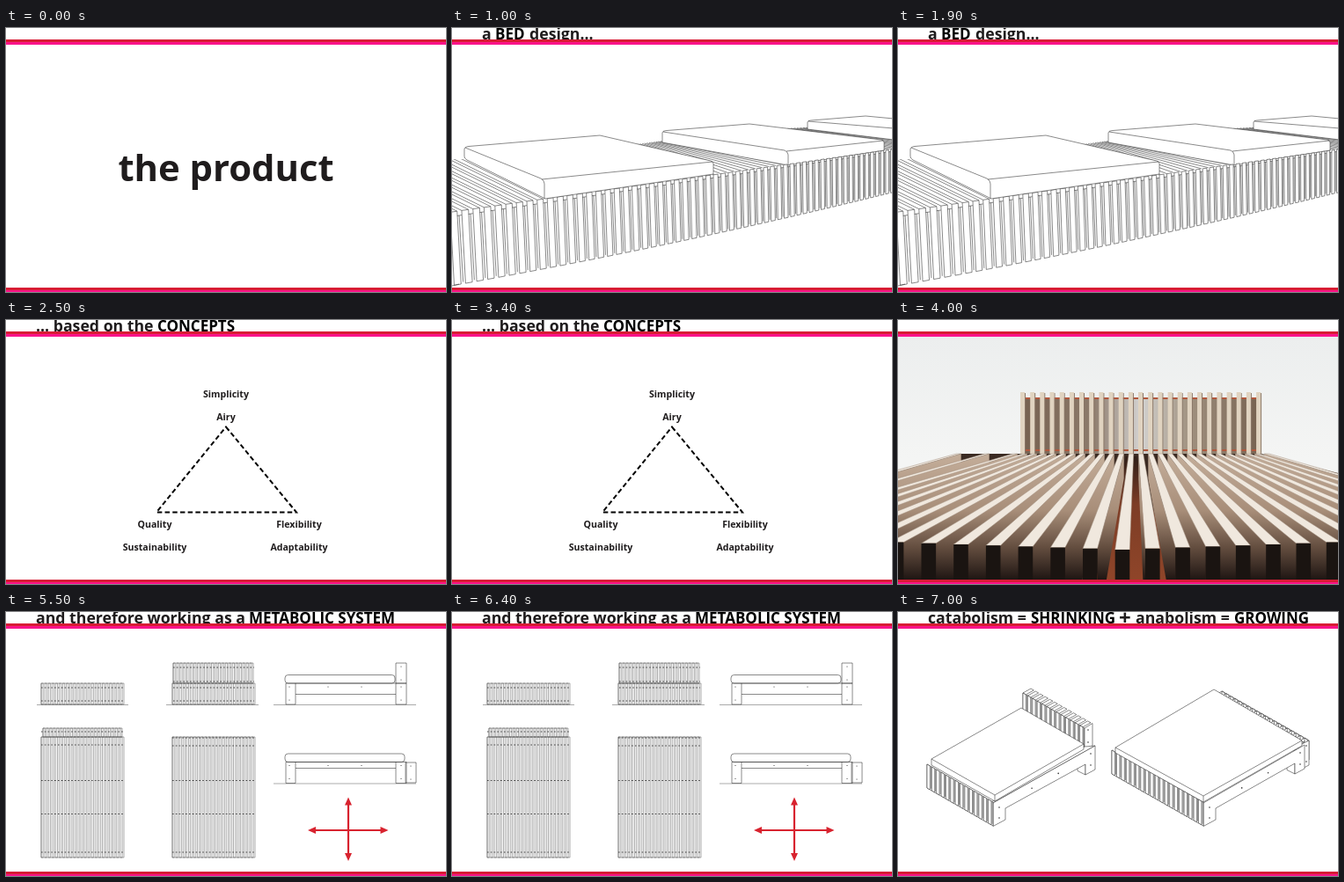
An HTML page for the animation above (8 s loop, 500 by 300 pixels).

```html
<!DOCTYPE html>
<html lang="en">
<head>
<meta charset="utf-8">
<title>The product</title>
<style>
  html, body { margin: 0; width: 100%; height: 100%; overflow: hidden; background: #fff; }
  svg { display: block; width: 100vw; height: 100vh; }
  text { font-family: "Open Sans", "Noto Sans", sans-serif; font-weight: 700; fill: #1f1c1d; }
  .head { font-size: 17.7px; }
  .caps { font-size: 17px; fill: #000; }
  .label { font-size: 10.6px; text-anchor: middle; }
  .ink, .solid { stroke: #2a2a2a; stroke-width: .55; stroke-linejoin: round; fill: none; }
  .solid { fill: #fff; }
  .thin { stroke: #555; stroke-width: .5; fill: none; }
  .dots { stroke: #333; stroke-width: .9; stroke-dasharray: 1.6 2.2; fill: none; }
</style>
</head>
<body>
<svg id="stage" viewBox="0 0 500 300" xmlns="http://www.w3.org/2000/svg"></svg>
<script>
const n1 = v => Math.round(v * 10) / 10;
const range = (a, b) => Array.from({ length: b - a }, (_, i) => a + i);
const mix = (a, b, t) => a + (b - a) * t;
const path = (d, attrs = '') => `<path d="${d}" ${attrs}/>`;
const seg = (x1, y1, x2, y2) => `M${n1(x1)} ${n1(y1)}L${n1(x2)} ${n1(y2)}`;
const quad = (...p) => 'M' + p.map(n1).join(' ') + 'Z';
const box = (x, y, w, h) => `M${n1(x)} ${n1(y)}h${n1(w)}v${n1(h)}h${n1(-w)}z`;
const solid = d => path(d, 'class="solid"');
const ink = d => path(d, 'class="ink"');
const dot = (x, y, r = .8) => `<circle cx="${x}" cy="${y}" r="${r}" fill="#333"/>`;

// Title parts: [x, text, capitals?]
const head = (...parts) => parts.map(([x, s, caps]) =>
  `<text class="head${caps ? ' caps' : ''}" x="${x}" y="13">${s}</text>`).join('');

function productScene() {
  return '<text x="250" y="174" font-size="41.8" text-anchor="middle">the product</text>';
}

// Long slatted bench in perspective with three mattresses
function benchScene() {
  const top = x => 209 - .142 * x;
  const foot = x => 292 - .175 * x - .00007 * x * x;
  let deck = '', posts = '', x = -2, s = 13;
  while (x < 500) {
    const r = x + .6 * s, m = x + .78 * s, next = x + s;
    const lean = 4.5 * Math.max(0, 1 - x / 480), nick = .4 * s;
    if (x < 110) {
      for (const a of [x, r]) deck += seg(a, top(a), a - 100, top(a) - 49);
    }
    posts += solid(quad(x, top(x), r, top(r), r + lean, foot(r), x + lean, foot(x)));
    posts += ink(seg(r, top(r) + nick, next, top(next) + nick) +
      seg(m, top(m) + nick, m + lean, foot(m) - 2));
    x = next;
    s *= .985;
  }
  let gaps = '';
  for (const i of range(0, 13)) {
    const t = i / 12;
    gaps += seg(mix(211, 242, t), mix(132, 128, t), mix(290, 384, t), mix(168, 154, t));
    gaps += seg(mix(364, 406, t), mix(115, 113, t), mix(482, 540, t), mix(140, 133, t));
  }
  return `<g clip-path="url(#deckClip)">${ink(deck)}</g>` +
    ink(gaps) +
    solid('M404 107Q404 105 408 105L470 100L502 103V127L404 115Z') + ink('M405 106L502 114') +
    solid('M239 119Q239 117 243 116.600L338 109L488 127Q491 128 491 130V139L382 156L239 130Z') +
    ink('M240 118L378 139Q382 141 382 144V156M380 140L490 128') +
    posts + ink('M0 293L8 291') +
    solid('M14 138Q14 135 19 134.500L168 122L294 151Q297 152 297 154V166L106 194L17 150Q14 148 14 146Z') +
    ink('M15 136L101 171Q105 173 105 177V194M102 172L296 152') +
    head([34, 'a'], [49, 'BED', 1], [88, 'design...']);
}

function conceptScene() {
  const labels = [[250, 88, 'Simplicity'], [250, 114, 'Airy'], [169, 236, 'Quality'],
    [169, 262, 'Sustainability'], [333, 236, 'Flexibility'], [333, 262, 'Adaptability']];
  return path('M250 121.500L330 218.500H171Z',
      'fill="none" stroke="#000" stroke-width="2" stroke-dasharray="5.5 3.2"') +
    labels.map(([x, y, s]) => `<text class="label" x="${x}" y="${y}">${s}</text>`).join('') +
    head([34, '... based on the'], [172, 'CONCEPTS', 1]);
}

// Timber bed seen from its foot
function timberScene() {
  let out = '<rect y="19" width="500" height="276" fill="url(#wall)"/>' +
    path('M0 172L69 152H413L500 174V295H0Z', 'fill="#3a2a22"') +
    path('M259 155H271L315 295H225Z', 'fill="url(#floor)"') +
    path(box(139, 89, 274, 63), 'fill="url(#behind)"') +
    path('M139 89H413M139 148H413', 'stroke="#b2573c" stroke-width="2"');
  for (const i of range(0, 25)) {
    const x = 139 + i * 11.17;
    out += path(box(x + 4.8, 83, 1.2, 69), 'fill="#8a7767"') +
      path(box(x, 82, 5, 70), 'fill="#e0d3c0"');
  }
  // Outer beams first, so that inner ones overlap them
  const order = range(-14, 15).sort((a, b) => Math.abs(b) - Math.abs(a));
  for (const k of order) {
    const fx = 255 + (k < 0 ? 36.7 : 34.3) * k, fy = 261 - 1.2 * Math.abs(k);
    const bx = 265 + 11 * k - 21 * Math.max(0, -12 - k);
    const side = k < 0 ? 1 : -1, w = 8.3, e = 2.7;
    if (k) {
      const f = fx + side * w, b = bx + side * e;
      out += path(quad(f, fy, b, 152, b, 180, f, 355), 'fill="url(#side)"');
    }
    out += path(quad(fx - w, fy, fx + w, fy, bx + e, 152, bx - e, 152),
        'fill="#f0e8de" stroke="#a39080" stroke-width=".5"') +
      path(box(fx - w, fy, 2 * w, 50), 'fill="#1a1411"');
  }
  return out;
}

// Front views, plans and side views
function systemScene() {
  const slats = (x, y, w, h, n = 23) => {
    const p = w / n;
    let d = box(x, y, w, h);
    for (const i of range(0, n)) d += box(x + i * p, y, p * .55, h);
    return path(d, 'class="thin"');
  };
  const rows = (x, w, ...ys) => path(ys.map(y => seg(x, y, x + w, y)).join(''), 'class="dots"');
  const ground = (a, b, y) => path(seg(a, y, b, y), 'class="thin"');
  const side = (y, railY, backX, backY, soft) => ink(
      `M318 ${y}H455V${y + 24}H443V${railY}H329V${y + 24}H318ZM329 ${y}V${railY}M443 ${y}V${railY}` +
      box(backX, backY, 12, 23)) +
    `<rect x="317" y="${y - 9.5}" width="${soft}" height="9.500" rx="3.500" class="ink"/>` +
    ground(304, 466, y + 24.5) +
    [[322, 4], [366, 4], [404, 4], [449, 4], [322, 19], [449, 19]].map(([x, d]) => dot(x, y + d, .6)).join('') +
    dot(backX + 6, backY + 4, .6) + dot(backX + 6, backY + 19, .6);

  return slats(40, 81, 94, 24) + rows(40, 94, 86, 101) + ground(35, 139, 105.5) +
    slats(190, 58, 91, 23) + slats(189, 81, 94, 24) +
    rows(190, 92, 63, 79, 86, 101) + ground(182, 287, 105.5) +
    slats(42, 132, 90, 10) + slats(40, 142, 94, 137) + rows(40, 94, 136, 151, 191.5, 229.5, 273) +
    slats(189, 142, 94, 137) + rows(189, 94, 143, 152, 191.5, 229.5, 273) +
    side(81, 93.5, 443, 58, 125) + side(170.5, 177.5, 454, 171, 136) +
    path('M349 248H428M389 217V277', 'stroke="#d8232f" stroke-width="2.200"') +
    path('M343 248l9 -4v8zM434.500 248l-9 -4v8zM389 210.500l-4 9h8zM389 283l-4 -9h8z', 'fill="#d8232f"') +
    head([34, 'and therefore working as a'], [276, 'METABOLIC SYSTEM', 1]);
}

// Row of upright slats running along an oblique edge; dx, dy give the depth of their tops
function slatRow(x1, y1, x2, y2, h, n, dx = 0, dy = 0) {
  let out = solid(quad(x1, y1, x2, y2, x2, y2 + h, x1, y1 + h));
  const px = (x2 - x1) / n, py = (y2 - y1) / n;
  for (const i of range(0, n)) {
    const x = x1 + i * px, y = y1 + i * py, r = x + px * .62, ry = y + py * .62;
    if (dx) out += solid(quad(x, y, r, ry, r + dx, ry + dy, x + dx, y + dy));
    out += solid(quad(x, y, r, ry, r, ry + h, x, y + h)) +
      ink(seg(r + px * .2, ry + 1, r + px * .2, ry + h - 1));
  }
  return out;
}

function growthScene() {
  const rail = (x, ex, ey) =>
    solid(`M${ex - 11} ${ey + 33}l-9 -4.500v-7l9 -3z`) +
    solid(`M${x} 217L${ex} ${ey}V${ey + 27}L${ex - 11} ${ey + 33}V${ey + 21}` +
      `L${x + 14} 223V236L${x} 243.500Z`) +
    dot(x + 7, 222) + dot(x + 7, 234) + dot(ex - 5, ey + 9) + dot(ex - 5, ey + 22) +
    dot(n1(mix(x, ex, .38)), n1(mix(217, ey, .38) + 8)) +
    dot(n1(mix(x, ex, .64)), n1(mix(217, ey, .64) + 8));

  const small = slatRow(142, 92, 212, 132, 26, 13, 9, -5) +
    solid('M212 132L221 126.500V152L212 157Z') + dot(216, 134) + dot(216, 148) +
    solid('M106 216L212 153L224 152L108 217Z') +
    rail(108, 224, 152) + slatRow(33, 173, 108, 216, 27, 14) +
    solid('M38 167L140 109L211 150V156L110 215L38 174Z') +
    ink('M38 167L110 208L211 150M110 208V215');

  const large = slatRow(368, 90, 467, 146, 22, 20, -5, 3) +
    solid('M455 152L467 146V174L455 180Z') + dot(464, 152) + dot(464, 170) +
    rail(347, 462, 151) + slatRow(243, 157, 347, 216, 27, 19) +
    solid('M247 154L359 88L459 146V152L347 216L247 160Z') +
    ink('M247 154L347 209L459 146M347 209V216');

  return small + large +
    head([34, 'catabolism ='], [151, 'SHRINKING', 1], [270, 'anabolism ='], [382, 'GROWING', 1]) +
    '<text x="251" y="14.5" font-size="24">+</text>';
}

const stops = (...list) => list.map(([o, c]) => `<stop offset="${o}" stop-color="${c}"/>`).join('');
const down = 'gradientUnits="userSpaceOnUse" x1="0" y1="152" x2="0" y2="295"';
const defs = `<defs>
  <clipPath id="deckClip"><path d="M0 149H17L104 194V200L0 215Z"/></clipPath>
  <linearGradient id="wall" x1="0" y1="0" x2="0" y2="1">${stops([0, '#eceeee'], [.5, '#f4f5f4'])}</linearGradient>
  <linearGradient id="behind">${stops([0, '#75604f'], [.3, '#8d7b6c'], [.5, '#d3d2d0'], [.7, '#a0917f'], [1, '#75604f'])}</linearGradient>
  <linearGradient id="side" ${down}>${stops([0, '#c4ae9a'], [.45, '#a88e79'], [.75, '#624c3e'], [1, '#1f1613'])}</linearGradient>
  <linearGradient id="floor" ${down}>${stops([0, '#2b1d17'], [.4, '#7d3d26'], [1, '#8f4529'])}</linearGradient>
</defs>`;

const bars = [13, 295].map(y =>
  `<rect y="${y}" width="500" height="6" fill="#fa148a"/><rect y="${y}" width="500" height="3" fill="#d81c34"/>`).join('');

const LOOP = 8000;
const scenes = [
  [0, productScene], [1000, benchScene], [2500, conceptScene],
  [4000, timberScene], [5500, systemScene], [7000, growthScene]
];

const stage = document.getElementById('stage');
stage.innerHTML = defs + scenes.map(([, draw]) => `<g class="scene">${draw()}</g>`).join('') + bars;
const groups = [...stage.querySelectorAll('.scene')];
const start = performance.now();

function tick() {
  const t = (performance.now() - start) % LOOP;
  const current = scenes.filter(([at]) => at <= t).length - 1;
  groups.forEach((g, i) => { g.style.display = i === current ? '' : 'none'; });
  requestAnimationFrame(tick);
}
tick();
</script>
</body>
</html>
```
